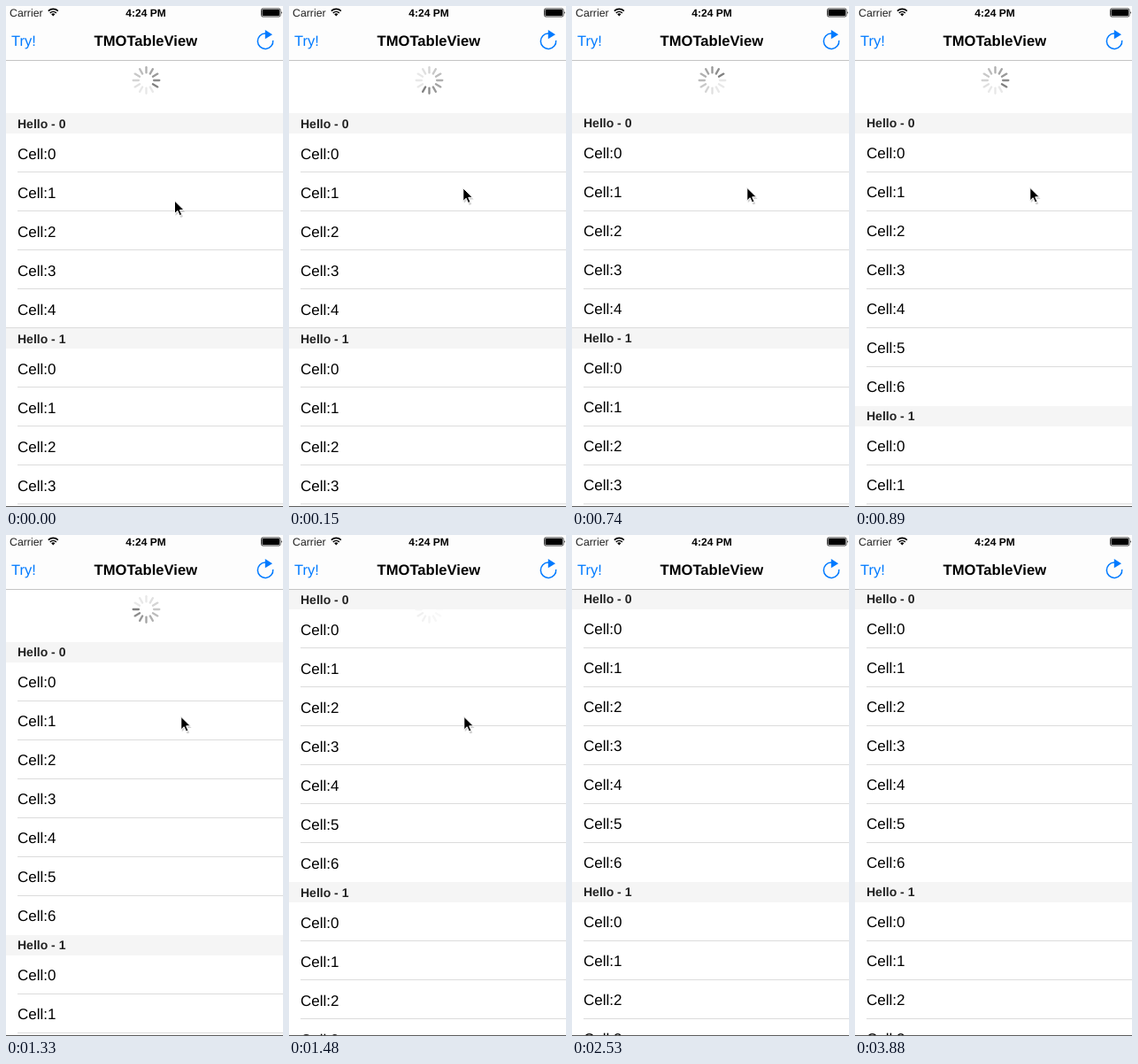
Recreate the animation shown at these times as an HTML page. Size 313x566 px, loop 3.91 s.

```html
<!DOCTYPE html>
<html lang="en">
<head>
<meta charset="utf-8">
<title>Table view refresh</title>
<style>
html, body { margin: 0; width: 100%; height: 100%; overflow: hidden; background: #fff; }
svg { display: block; width: 313px; height: 566px; }
text { font-family: "Liberation Sans", Arial, sans-serif; text-rendering: geometricPrecision; }
.cell { font-size: 17px; }
.head { font-size: 14px; font-weight: bold; fill: #222; }
.blue { fill: #007aff; }
</style>
</head>
<body>
<svg viewBox="0 0 313 566">
  <defs>
    <clipPath id="below"><rect y="84.5" width="313" height="40"/></clipPath>
  </defs>
  <rect width="313" height="566" fill="#fff"/>
  <g id="list"></g>
  <g id="clip"><g id="spinner" transform="translate(158.5 84)"></g></g>

  <rect width="313" height="61" fill="#fdfdfd"/>
  <rect y="61" width="313" height="1" fill="#c4c4c4"/>
  <text x="4" y="11.7" font-size="12.3" fill="#222">Carrier</text>
  <g fill="none" stroke="#000" stroke-width="1.6">
    <path d="M47.8 5.6a8 8 0 0 1 11 0M49.8 7.9a5 5 0 0 1 7 0"/>
    <path d="M53.3 11.6L51.2 9.3a3 3 0 0 1 4.2 0z" fill="#000" stroke="none"/>
  </g>
  <text x="158" y="11.7" font-size="12" font-weight="bold" text-anchor="middle">4:24 PM</text>
  <rect x="288.5" y="3" width="21.5" height="9" rx="1.6" fill="none" stroke="#000" stroke-width=".8"/>
  <rect x="289.5" y="4" width="19.5" height="7" rx=".8"/>
  <path d="M311 6q1.6 1.5 0 3z"/>

  <text class="blue" x="6" y="45" font-size="16.5">Try!</text>
  <text x="157.8" y="45" font-size="16.6" font-weight="bold" text-anchor="middle">TMOTableView</text>
  <path d="M301.7 38.8A8.7 8.7 0 1 1 293 31" fill="none" stroke="#007aff" stroke-width="1.5"/>
  <path class="blue" d="M292.8 27L301 32.2L292.8 37.2z"/>

  <rect y="565" width="313" height="1" fill="#5c5c5c"/>
  <g id="cursor">
    <path d="M1 2v15l3.5-3.2 2.4 5.4 2.6-1.1-2.4-5.3h4.8z" fill="#000" opacity=".18"/>
    <path d="M0 0v14.6l3.4-3.2 2.3 5.3 2.5-1.1-2.3-5.1h4.7z" stroke="#fff" stroke-width="1"/>
  </g>
</svg>
<script>
const LOOP = 3910, ROW = 44, HEAD = 23, SPOKES = 12;

// Each step holds from `at`; values left out carry over from the step before.
// head: darkest spoke, nudge: label settling, cur: pointer tip
const steps = [
  { at: 0, rows: 5, top: 121, nudge: 0.5, head: 4, alpha: 1, cur: [190.5, 220] },
  { at: 150, head: 7, cur: [196.8, 205.8] },
  { at: 300, head: 9, nudge: 0 },
  { at: 440, head: 11 },
  { at: 590, head: 0 },
  { at: 740, head: 2, cur: [197.8, 205.3] },
  { at: 890, head: 4, rows: 7 },
  { at: 1030, head: 6 },
  { at: 1180, head: 7 },
  { at: 1330, head: 9 },
  { at: 1480, head: 11, top: 61, nudge: 0.5, alpha: 0.16 },
  { at: 1630, nudge: 0, alpha: 0 },
  { at: 2230, cur: [237.5, 459] },
  { at: 2380, cur: [237.5, 470.5] },
  { at: 2530, cur: null }
];
for (let i = 1; i < steps.length; i++) steps[i] = { ...steps[i - 1], ...steps[i] };

const $ = id => document.getElementById(id);

function add(parent, tag, attrs, text = "") {
  const el = document.createElementNS("http://www.w3.org/2000/svg", tag);
  for (const k in attrs) el.setAttribute(k, attrs[k]);
  el.textContent = text;
  return parent.appendChild(el);
}

function drawList({ rows, top, nudge }) {
  const list = $("list");
  list.replaceChildren();
  let y = top;
  [rows, 5].forEach((count, section) => {
    add(list, "rect", { x: 0, y, width: 313, height: HEAD, fill: "#f5f5f5" });
    add(list, "text", { class: "head", x: 13, y: y + 16 + nudge }, "Hello - " + section);
    y += HEAD;
    for (let i = 0; i < count && y < 566; i++, y += ROW) {
      const last = i === count - 1;
      add(list, "text", { class: "cell", x: 13, y: y + 28 + nudge }, "Cell:" + i);
      if (!last || count === 5)
        add(list, "rect", { x: last ? 0 : 13, y: y + ROW - 1, width: 313, height: 1, fill: "#dcdcdc" });
    }
  });
}

const spokes = Array.from({ length: SPOKES }, (_, i) =>
  add($("spinner"), "line", {
    y1: -8.6, y2: -14.8, "stroke-width": 2.3, "stroke-linecap": "round",
    transform: `rotate(${i * 360 / SPOKES})`
  }));

function drawSpinner({ head, alpha, top }) {
  spokes.forEach((spoke, i) => {
    const age = (head - i + SPOKES) % SPOKES;
    const g = Math.min(232, 128 + age * 12);
    spoke.setAttribute("stroke", `rgb(${g},${g},${g})`);
  });
  $("spinner").setAttribute("opacity", alpha);
  $("clip").setAttribute("clip-path", top < 100 ? "url(#below)" : "none");
}

function drawCursor({ cur }) {
  $("cursor").setAttribute("visibility", cur ? "visible" : "hidden");
  if (cur) $("cursor").setAttribute("transform", `translate(${cur})`);
}

let shown = null;
const start = performance.now();

function tick() {
  const t = (performance.now() - start) % LOOP;
  const step = steps.findLast(s => s.at <= t);
  if (step !== shown) {
    shown = step;
    drawList(step);
    drawSpinner(step);
    drawCursor(step);
  }
  requestAnimationFrame(tick);
}
tick();
</script>
</body>
</html>
```
